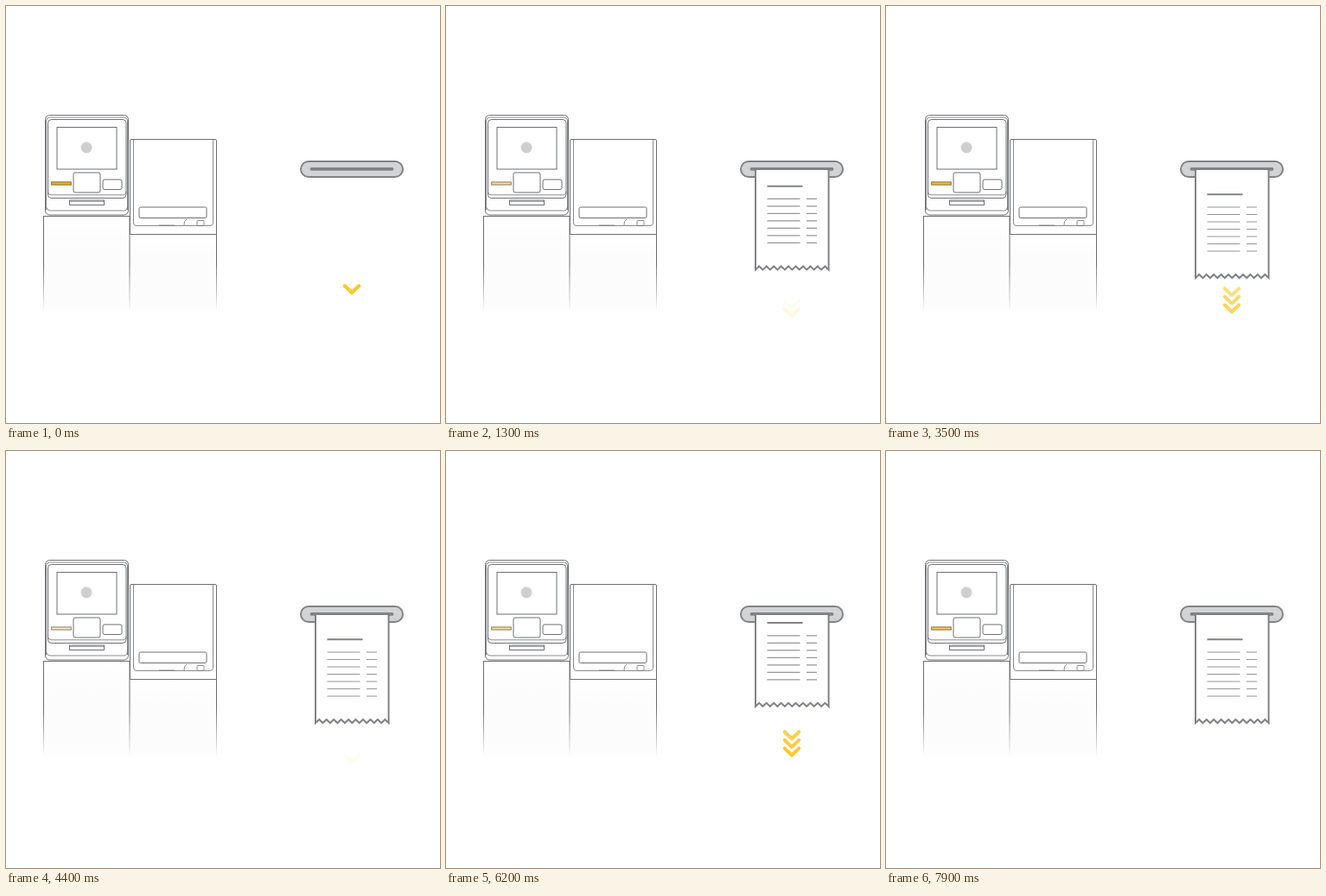
These frames come from a looping animation (502 px wide and 483 px high, 8 s). An HTML page:

```html
<!DOCTYPE html>
<html lang="en">
<head>
<meta charset="utf-8">
<title>Receipt printer</title>
<style>
  html, body { margin: 0; width: 100%; height: 100%; overflow: hidden; background: #fff; }
  svg { display: block; width: 502px; height: 483px; }
  .unit { fill: #fff; stroke: #6d6e71; stroke-width: 1; }
  .thin { fill: none; stroke-width: .8; }
  .bold { fill: none; stroke: #808285; stroke-width: 2; }
  .chevron { fill: none; stroke: #ffc72c; stroke-width: 4; stroke-linecap: round; stroke-linejoin: round; }
</style>
</head>
<body>
<svg viewBox="0 0 502 483">
  <defs>
    <linearGradient id="edge" gradientUnits="userSpaceOnUse" x1="0" y1="243" x2="0" y2="354">
      <stop offset="0" stop-color="#6d6e71"/>
      <stop offset=".5" stop-color="#6d6e71"/>
      <stop offset="1" stop-color="#6d6e71" stop-opacity="0"/>
    </linearGradient>
    <linearGradient id="body" x1="0" y1="0" x2="0" y2="1">
      <stop offset="0" stop-color="#fff"/>
      <stop offset=".3" stop-color="#fcfcfc"/>
      <stop offset=".9" stop-color="#fcfcfc"/>
      <stop offset="1" stop-color="#fff"/>
    </linearGradient>
    <clipPath id="below"><rect x="340" y="190" width="120" height="140"/></clipPath>
  </defs>

  <!-- cabinets -->
  <rect x="44" y="243" width="99" height="114" fill="url(#body)"/>
  <rect x="143" y="264" width="101" height="93" fill="url(#body)"/>
  <path d="M43.5 243V354M143 243V354M243.5 264V354" fill="none" stroke="url(#edge)"/>
  <path d="M43 243.5H143M143 264.5H244" fill="none" stroke="#6d6e71"/>

  <!-- right unit -->
  <g class="unit">
    <path d="M143.5 264V156Q143.5 154.5 145 154.5H242Q243.5 154.5 243.5 156V264"/>
    <path class="thin" d="M147.5 154.5V251Q147.5 254.5 151 254.5H236Q239.5 254.5 239.5 251V154.5"/>
    <rect x="154" y="233" width="78" height="12.5" rx="1.5"/>
    <path class="thin" d="M209 247Q205.5 249 206 254M177 254H195"/>
    <rect class="thin" x="221" y="248.5" width="8" height="6" rx="1"/>
  </g>

  <!-- left unit -->
  <g class="unit">
    <rect x="45.5" y="126.5" width="96" height="115.5" rx="5"/>
    <path class="thin" d="M46.5 236V133Q46.5 129 50.5 129H136.5Q140.5 129 140.5 133V236"/>
    <rect x="48.5" y="131.5" width="90.5" height="91" rx="4"/>
    <path class="thin" d="M48.5 215Q48.5 218.8 52 218.8H135.5Q139 218.8 139 215M46.5 233Q47.5 237 51 237H136.5Q140 237 140.5 233"/>
    <rect x="59" y="140.5" width="69" height="48.5"/>
    <rect x="78" y="193" width="31" height="23" rx="2"/>
    <rect x="112" y="201" width="22" height="11.5" rx="2"/>
    <rect x="73.5" y="225" width="40" height="5.5"/>
    <path class="thin" d="M74 226.3H113"/>
    <rect x="52.7" y="204" width="22.6" height="3" stroke="#8a8272"/>
  </g>
  <rect id="lamp" x="52.7" y="204" width="22.6" height="3" fill="#e8b52c" stroke="#a07d1c"/>
  <circle cx="93" cy="164" r="6.5" fill="#cfcfcf"/>

  <!-- printer -->
  <rect class="bold" x="341" y="180" width="118" height="18" rx="9" style="fill:#d1d3d4"/>
  <path d="M353.5 188.8H446.5" stroke="#808285" stroke-width="3.8" stroke-linecap="round"/>
  <g clip-path="url(#below)">
    <g id="receipt">
      <path id="paper" class="bold" style="fill:#fff"/>
      <path class="bold" d="M371.5 218.2H412.5"/>
      <path id="rows" fill="none" stroke="#939598" stroke-width="1.2"/>
    </g>
  </g>
  <g id="chevrons"></g>
</svg>
<script>
  const LOOP = 8000;
  const $ = id => document.getElementById(id);
  const lamp = $('lamp'), receipt = $('receipt');

  // paper with a serrated lower edge
  const left = 358, right = 442.6, teeth = 10, step = (right - left) / teeth / 2;
  let d = `M${left} 150V315`;
  for (let i = 1; i <= teeth * 2; i++) d += `L${left + i * step} ${i % 2 ? 311 : 315}`;
  $('paper').setAttribute('d', d + 'V150');

  let rows = '';
  for (let i = 0; i < 7; i++) {
    const y = 233 + i * 8.5;
    rows += `M371.5 ${y}H409.5M417 ${y}H429`;
  }
  $('rows').setAttribute('d', rows);

  const chevrons = [0, 1, 2].map(() => {
    const p = document.createElementNS('http://www.w3.org/2000/svg', 'path');
    p.setAttribute('class', 'chevron');
    p.setAttribute('d', 'M391.7 324L400 332L408.3 324');
    return $('chevrons').appendChild(p);
  });

  function draw(t) {
    lamp.setAttribute('opacity', 0.5 + 0.5 * Math.cos((t + 50) / 1900 * 2 * Math.PI));

    const printed = Math.min(1, t % 5000 / 1400);
    receipt.setAttribute('transform', `translate(0 ${(printed - 1) * 135})`);

    chevrons.forEach((c, i) => {
      const k = (t % 3000 - i * 100) / 1300;
      c.setAttribute('opacity', k < 0 || k > 1 ? 0 : 1 - k);
      c.setAttribute('transform', `translate(0 ${i * 10.2 + k * 8})`);
    });
  }

  const start = performance.now();
  function tick() {
    draw((performance.now() - start) % LOOP);
    requestAnimationFrame(tick);
  }
  tick();
</script>
</body>
</html>
```
